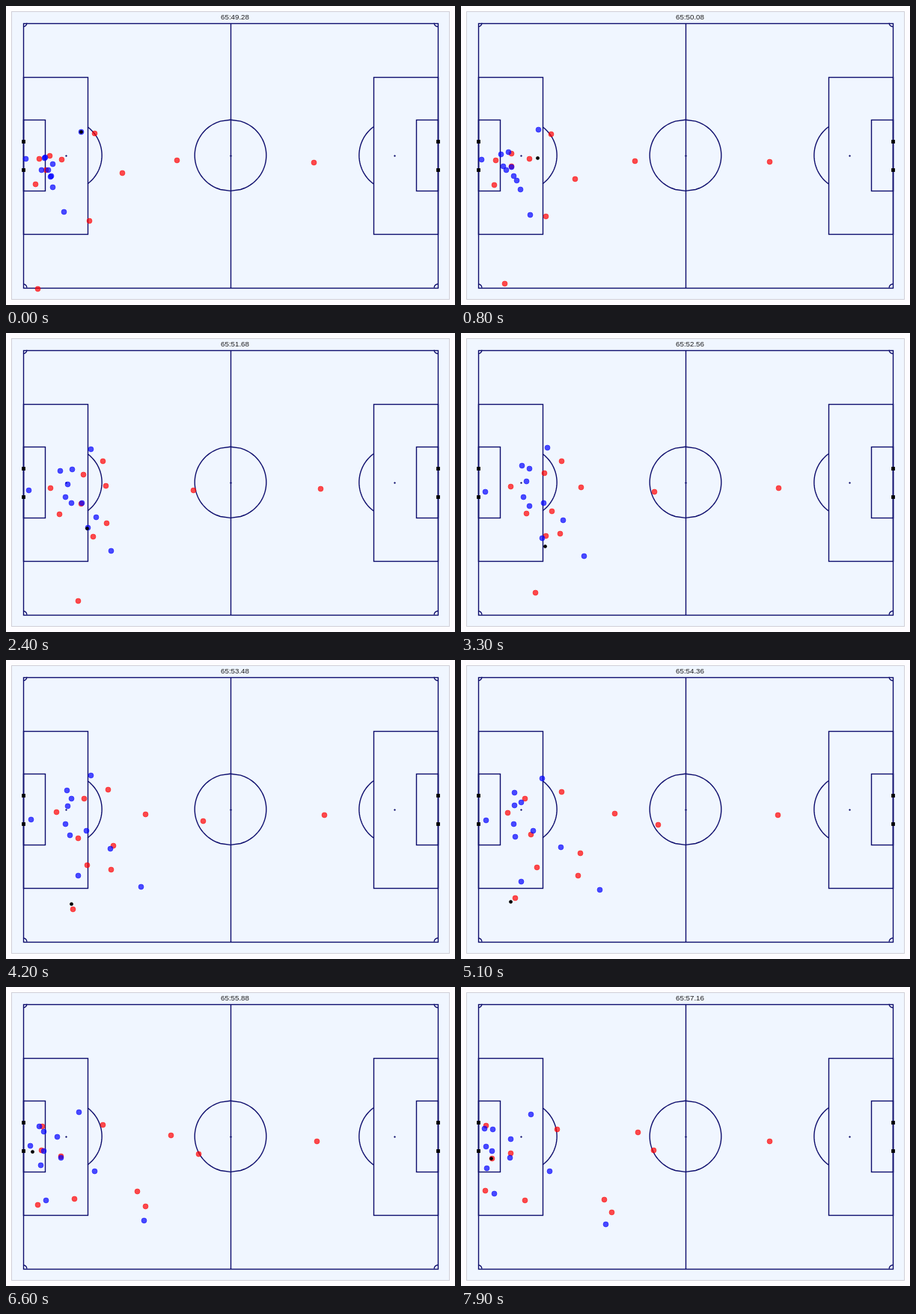
Animation, 600 px wide and 400 px high, one loop 8000 ms. Source, as an HTML page with a canvas:

```html
<!DOCTYPE html>
<html lang="en">
<head>
<meta charset="utf-8">
<title>Match tracking</title>
<style>
html, body { margin: 0; width: 100%; height: 100%; overflow: hidden; background: #fefcff; }
canvas { display: block; width: 600px; height: 400px; }
</style>
</head>
<body>
<canvas id="stage" width="600" height="400"></canvas>
<script>
const ctx = document.getElementById('stage').getContext('2d');
const LOOP = 8000, STEP = 100, SAMPLE = 40, SPAN = 7.88;
const START = 49.28;
const NAVY = '#0c0c6c';

// Pitch centre and half size in pixels; markings are measured in yards
const MX = 300, MY = 199.8, HALF_W = 277, HALF_H = 177;
const YX = 4.779, YY = 4.76;
const PT = 50 / 72;

const lerp = (a, b, u) => a + (b - a) * u;
const snap = v => Math.round(v) + 0.5;
const pixel = v => Math.floor(v) + 0.5;

// Out and back once; a higher lag puts the peak later
const surge = (u, lag) => Math.sin(Math.PI * u ** lag) ** 2;

// A run goes from a to b, swinging away by (dx, dy) on the way
const run = (ax, ay, bx, by, dx, dy, lagX = 0.85, lagY = lagX) => u => [
  lerp(ax, bx, u) + dx * surge(u, lagX),
  lerp(ay, by, u) + dy * surge(u, lagY)
];

const reds = [
  run(411, 209, 412.5, 206, 14, 0, 1),
  run(228, 206.3, 257.5, 218.5, 20, 8, 1, 2.5),
  run(42, 378, 32, 272, 62, 14, 0.75),
  run(118, 170.7, 128, 190, 13, -8, 1),
  run(74, 205.5, 236, 194, 28, 8, 1.35),
  run(53, 219, 191, 284.5, 18, -12, 1.4, 0.4),
  run(155.5, 223, 201.5, 301.5, -42, 16, 0.85, 1.2),
  run(111, 287, 85, 285.5, 14, -15, 0.7),
  run(58, 200.5, 33, 185, 64, -7),
  run(44, 204, 41, 229.5, 25, -16, 1, 1.5),
  run(39, 238, 66, 222, 43, 10, 1.1, 0.75)
];

const blues = [
  run(26, 204.5, 33, 213, 4, 5, 1),
  run(100.5, 168, 93, 170.5, 18, -16),
  run(77, 275, 193, 317.5, 42, 6, 1),
  run(52, 202.3, 31, 189.5, 41, -21, 1),
  run(51.5, 203, 66, 203.5, 34, -22, 0.72),
  run(47.5, 219.5, 42.5, 190, 42, -9, 0.8),
  run(62.5, 211, 34.5, 242, 41, 8),
  run(56, 219.5, 41.5, 219.5, 34, 0),
  run(60.5, 227.5, 65.5, 228.5, 48, 0),
  run(59, 228.5, 118, 246.5, 53, 15),
  run(62, 242, 44, 276.5, 55, 32, 0.7, 1.5)
];

// Touches of the ball: seconds, x, y
const touches = [
  [0, 100.5, 168], [1.6, 105, 239.5], [3.28, 112.5, 285.5], [4.2, 87.5, 326],
  [5.08, 66.5, 323.5], [6.6, 35, 220.5], [SPAN, 40.5, 229.5]
];

function ballAt(s) {
  const i = Math.max(1, touches.findIndex(k => k[0] >= s));
  const [s0, x0, y0] = touches[i - 1], [s1, x1, y1] = touches[i];
  const u = (s - s0) / (s1 - s0);
  return [lerp(x0, x1, u), lerp(y0, y1, u)];
}

function line(points) {
  ctx.beginPath();
  for (const [x, y] of points) ctx.lineTo(x, y);
  ctx.stroke();
}

function box(x0, y0, x1, y1) {
  const l = snap(x0), t = snap(y0);
  ctx.strokeRect(l, t, snap(x1) - l, snap(y1) - t);
}

// Bow of radius r yards, in even steps of height from y0 to y1
function bow(cx, cy, r, dir, y0, y1) {
  line(Array.from({ length: 50 }, (_, i) => {
    const y = lerp(y0, y1, i / 49);
    return [cx + dir * YX * Math.sqrt(Math.max(0, r * r - y * y)), cy + YY * y];
  }));
}

function dot(x, y, size) {
  ctx.lineWidth = PT;
  ctx.beginPath();
  ctx.arc(pixel(x), pixel(y), size * PT / 2, 0, 2 * Math.PI);
  ctx.fill();
  ctx.stroke();
}

function drawEnd(dir) {
  const x = MX - dir * HALF_W, spot = x + dir * 12 * YX;
  ctx.strokeStyle = ctx.fillStyle = NAVY;
  for (const [depth, half] of [[18, 22], [6, 10]])
    box(x, MY - half * YY, x + dir * depth * YX, MY + half * YY);
  bow(spot, MY, 10, dir, -8, 8);
  bow(x, MY - HALF_H, 1, dir, 0, 1);
  bow(x, MY + HALF_H, 1, dir, 0, -1);
  dot(spot, snap(MY), 2.5);
  ctx.fillStyle = '#000';
  for (const side of [-4, 4])
    ctx.fillRect(snap(x) - 2.4, snap(MY + side * YY) - 2.4, 4.8, 4.8);
  ctx.lineWidth = 2 * PT;
}

function drawPitch() {
  ctx.fillStyle = '#fefcff';
  ctx.fillRect(0, 0, 600, 400);
  ctx.fillStyle = '#f0f6ff';
  ctx.fillRect(7.5, 7.5, 585, 385);
  ctx.lineWidth = 1;
  ctx.strokeStyle = '#d0d0d8';
  ctx.strokeRect(7.5, 7.5, 585, 385);

  ctx.lineWidth = 2 * PT;
  ctx.strokeStyle = ctx.fillStyle = NAVY;
  box(MX - HALF_W, MY - HALF_H, MX + HALF_W, MY + HALF_H);
  line([[snap(MX), snap(MY - HALF_H)], [snap(MX), snap(MY + HALF_H)]]);
  for (const dir of [1, -1]) bow(MX, MY, 10, dir, -10, 10);
  drawEnd(1);
  drawEnd(-1);
  ctx.strokeStyle = ctx.fillStyle = NAVY;
  dot(MX, snap(MY), 2.5);
}

function drawTeam(team, color, u) {
  ctx.fillStyle = ctx.strokeStyle = color;
  ctx.globalAlpha = 0.7;
  for (const player of team) dot(...player(u), 10);
  ctx.globalAlpha = 1;
}

function draw(ms) {
  const s = Math.floor(ms / SAMPLE) * SAMPLE / 1000;
  drawPitch();
  drawTeam(reds, '#ff0000', s / SPAN);
  drawTeam(blues, '#0000ff', s / SPAN);
  ctx.fillStyle = ctx.strokeStyle = '#000';
  dot(...ballAt(s), 6);
  ctx.fillStyle = '#1c1c1c';
  ctx.font = '9.72px "Liberation Sans", Arial, sans-serif';
  ctx.textAlign = 'center';
  ctx.fillText('65:' + (START + s).toFixed(2), 306, 18);
}

const begin = performance.now();
function tick(now) {
  const t = Math.max(0, now - begin) % LOOP;
  draw(Math.floor(t / STEP) * STEP);
  requestAnimationFrame(tick);
}
draw(0);
requestAnimationFrame(tick);
</script>
</body>
</html>
```
